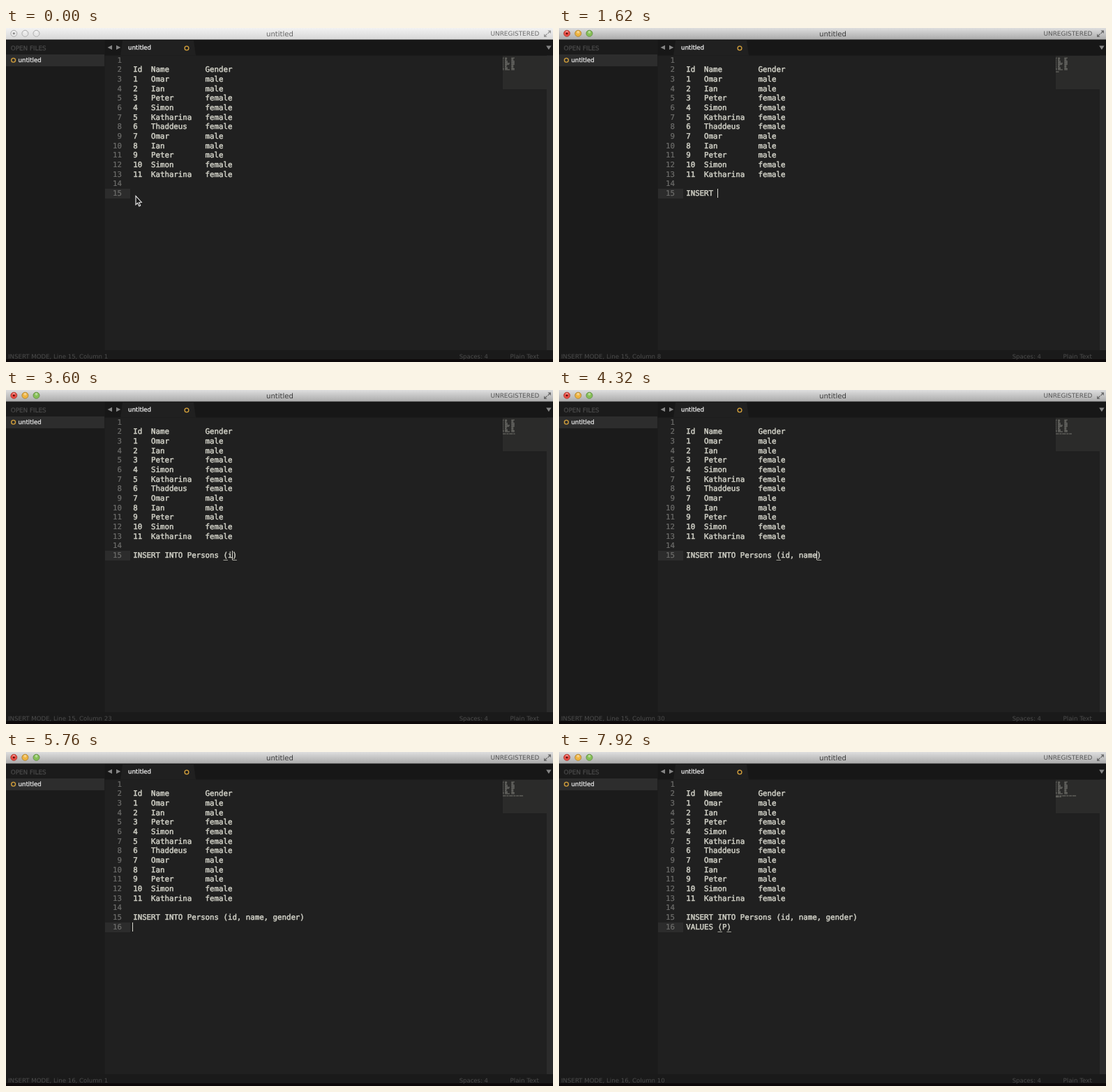
Animation of 784 by 480 pixels, one loop 8 s. Source, as an HTML page with a canvas:

```html
<!DOCTYPE html>
<html lang="en">
<head>
<meta charset="utf-8">
<title>untitled</title>
<style>
html, body { margin: 0; width: 100%; height: 100%; overflow: hidden; background: #202020; }
canvas { display: block; }
</style>
</head>
<body>
<canvas id="stage" width="784" height="480"></canvas>
<script>
const ctx = document.getElementById('stage').getContext('2d');
const STEP = 180, LOOP = 8000;
const MONO = '"DejaVu Sans Mono", monospace', SANS = '"DejaVu Sans", sans-serif';
const SIZE = 10.74, CHAR = SIZE * .602, LEFT = 182.2, ROW = 13.68, LINE1 = 49.6;

const people = ['Omar', 'Ian', 'Peter', 'Simon', 'Katharina', 'Thaddeus', 'Omar', 'Ian', 'Peter', 'Simon', 'Katharina'];
const genders = [...'mmffffmmmff'].map(g => g === 'm' ? 'male' : 'female');
const row = (id, name, gender) => String(id).padEnd(4) + name.padEnd(12) + gender;
const table = ['', row('Id', 'Name', 'Gender'), ...people.map((p, i) => row(i + 1, p, genders[i])), ''];

const script = 'INSERT INTO Persons (id, name, gender)\nVALUES (P';
// [step, characters typed by then]
const keys = [[4, 0], [9, 7], [12, 11], [15, 16], [18, 19], [24, 29], [31, 38], [32, 39], [34, 39], [36, 41], [42, 47], [44, 48]];

function typedAt(step) {
  if (step <= keys[0][0]) return 0;
  const k = keys.findIndex(key => key[0] >= step);
  const [s0, n0] = keys[k - 1], [s1, n1] = keys[k];
  return Math.floor(n0 + (n1 - n0) * (step - s0) / (s1 - s0) + 1e-6);
}

function box(x, y, w, h, color) {
  ctx.fillStyle = color;
  ctx.fillRect(x, y, w, h);
}

function text(s, x, y, size, color, { font = SANS, align = 'left', weight = 0 } = {}) {
  ctx.font = size + 'px ' + font;
  ctx.textRendering = 'geometricPrecision';
  ctx.textAlign = align;
  ctx.fillStyle = ctx.strokeStyle = color;
  ctx.fillText(s, x, y);
  if (weight) {
    ctx.lineWidth = weight;
    ctx.strokeText(s, x, y);
  }
}

function shape(points, fill, stroke, width = 1) {
  ctx.beginPath();
  points.forEach(([x, y]) => ctx.lineTo(x, y));
  ctx.closePath();
  if (fill) { ctx.fillStyle = fill; ctx.fill(); }
  if (stroke) { ctx.strokeStyle = stroke; ctx.lineWidth = width; ctx.stroke(); }
}

function disc(x, y, r, fill, stroke, width = 1) {
  ctx.beginPath();
  ctx.arc(x, y, r, 0, 7);
  if (fill) { ctx.fillStyle = fill; ctx.fill(); }
  if (stroke) { ctx.strokeStyle = stroke; ctx.lineWidth = width; ctx.stroke(); }
}

function titleBar(active) {
  const g = ctx.createLinearGradient(0, 0, 0, 16);
  g.addColorStop(0, active ? '#dedede' : '#f2f2f2');
  g.addColorStop(1, active ? '#acacac' : '#d8d8d8');
  box(0, 0, 784, 16, g);
  box(0, 16, 784, 1, active ? '#666' : '#888');
  const lights = active
    ? [['#ea4a42', '#b0443c'], ['#efb440', '#b18836'], ['#86c056', '#66904a']]
    : Array(3).fill(['#e6e6e6', '#adadad']);
  lights.forEach(([fill, edge], i) => {
    const x = 11.3 + 16.1 * i;
    disc(x, 7.8, 4.5, fill, edge);
    ctx.globalAlpha = .4;
    disc(x, 5.9, 1.9, '#fff');
    ctx.globalAlpha = 1;
  });
  disc(11.3, 7.8, 1.5, active ? '#5e0f0b' : '#888');
  text('untitled', 392.5, 11.8, 10.1, active ? '#3a3a3a' : '#666', { align: 'center' });
  text('UNREGISTERED', 694.5, 11.1, 8.92, active ? '#555' : '#6c6c6c');
  const icon = active ? '#6c6c6c' : '#999';
  shape([[776.5, 3.5], [781, 3.5], [781, 8]], icon);
  shape([[771, 8.5], [771, 13], [775.5, 13]], icon);
  ctx.beginPath();
  ctx.moveTo(776.5, 8); ctx.lineTo(779.5, 5);
  ctx.moveTo(772.5, 11.5); ctx.lineTo(775.5, 8.5);
  ctx.strokeStyle = icon;
  ctx.lineWidth = 1.2;
  ctx.stroke();
}

function chrome() {
  box(0, 0, 784, 480, '#202020');
  box(0, 17, 141.5, 446, '#1b1b1b');
  box(0, 38, 141, 17, '#2d2d2d');
  box(141.5, 17, 642.5, 22.5, '#171717');
  shape([[164, 39.5], [167, 18], [269, 18], [272, 39.5]], '#202020');
  box(775, 39.5, 9, 423.5, '#2b2b2b');
  box(712, 40, 63, 48, '#2b2b2a');
  box(0, 463, 784, 13, '#1a1a1a');
  box(0, 476, 784, 4, '#0d090a');

  text('OPEN FILES', 6.8, 31.8, 8.8, '#484848', { weight: .3 });
  text('untitled', 17.6, 49.2, 8.55, '#dcdcdc', { weight: .35 });
  text('untitled', 175, 31.4, 8.55, '#e2e2e2', { weight: .35 });
  disc(10.6, 46.3, 2.9, null, '#d9a43c', 1.3);
  disc(259, 29, 2.9, null, '#d9a43c', 1.3);
  shape([[145.5, 28], [152, 24.8], [152, 31.2]], '#858585');
  shape([[164.3, 28], [158, 24.8], [158, 31.2]], '#858585');
  shape([[774.2, 25.4], [781.6, 25.4], [777.9, 31.2]], '#858585');
}

function minimap(lines) {
  lines.forEach((line, n) => {
    for (const word of line.matchAll(/\S+/g))
      box(712 + word.index * .765, 41 + n * 1.53, word[0].length * .765, 1.1, 'rgba(205,205,195,.42)');
  });
}

function pointer(step) {
  if (step === 0) {
    shape([[186, 241.5], [186, 254], [188.7, 251.4], [190.7, 256], [192.7, 255.1], [190.7, 250.7], [194.3, 250.5]],
      '#1a1a1a', '#eee', 1.1);
    return;
  }
  ctx.beginPath();
  ctx.moveTo(186.8, 237.3); ctx.quadraticCurveTo(190, 237.3, 190, 239.5);
  ctx.lineTo(190, 247); ctx.quadraticCurveTo(190, 249.2, 186.8, 249.2);
  ctx.moveTo(193.2, 237.3); ctx.quadraticCurveTo(190, 237.3, 190, 239.5);
  ctx.moveTo(193.2, 249.2); ctx.quadraticCurveTo(190, 249.2, 190, 247);
  ctx.moveTo(188.3, 245.2); ctx.lineTo(191.7, 245.2);
  ctx.strokeStyle = '#ddd';
  ctx.lineWidth = 1.1;
  ctx.stroke();
}

function draw(step) {
  const typed = typedAt(step);
  const entered = script.slice(0, typed).split('\n');
  const current = entered.at(-1);
  const col = current.length;
  const open = current.indexOf('(');
  // The editor closes an open bracket by itself.
  if (open >= 0 && !current.includes(')')) entered[entered.length - 1] += ')';
  const lines = [...table, ...entered];
  const last = lines.length;
  const base = n => LINE1 + (n - 1) * ROW;
  const top = Math.round(base(last) - 10.2);

  chrome();
  titleBar(step > 0);
  box(142, top, 36, 14, '#2c2c2c');
  lines.forEach((line, i) => {
    const y = base(i + 1);
    text(i + 1, 165.9, y, SIZE, '#6e6e6c', { font: MONO, align: 'right', weight: .2 });
    text(line, LEFT, y, SIZE, '#cecec4', { font: MONO, weight: .5 });
  });
  if (open >= 0) {
    const close = lines[last - 1].indexOf(')');
    for (const c of [open, close]) box(LEFT + c * CHAR, top + 13, CHAR, 1, '#a5a59d');
  }
  if (step > 0 && step < 44) box(Math.round(LEFT + col * CHAR - .8), top, 1, 13, '#d8d8d0');
  minimap(lines);

  text(`INSERT MODE, Line ${last}, Column ${col + 1}`, 3, 474.9, 8.62, '#4c4c4c');
  text('Spaces: 4', 649.7, 474.9, 8.5, '#4c4c4c');
  text('Plain Text', 722.6, 474.9, 8.7, '#4c4c4c');
  if (!typed) pointer(step);
}

function tick(now) {
  draw(Math.floor(now % LOOP / STEP));
  requestAnimationFrame(tick);
}
draw(0);
requestAnimationFrame(tick);
</script>
</body>
</html>
```
